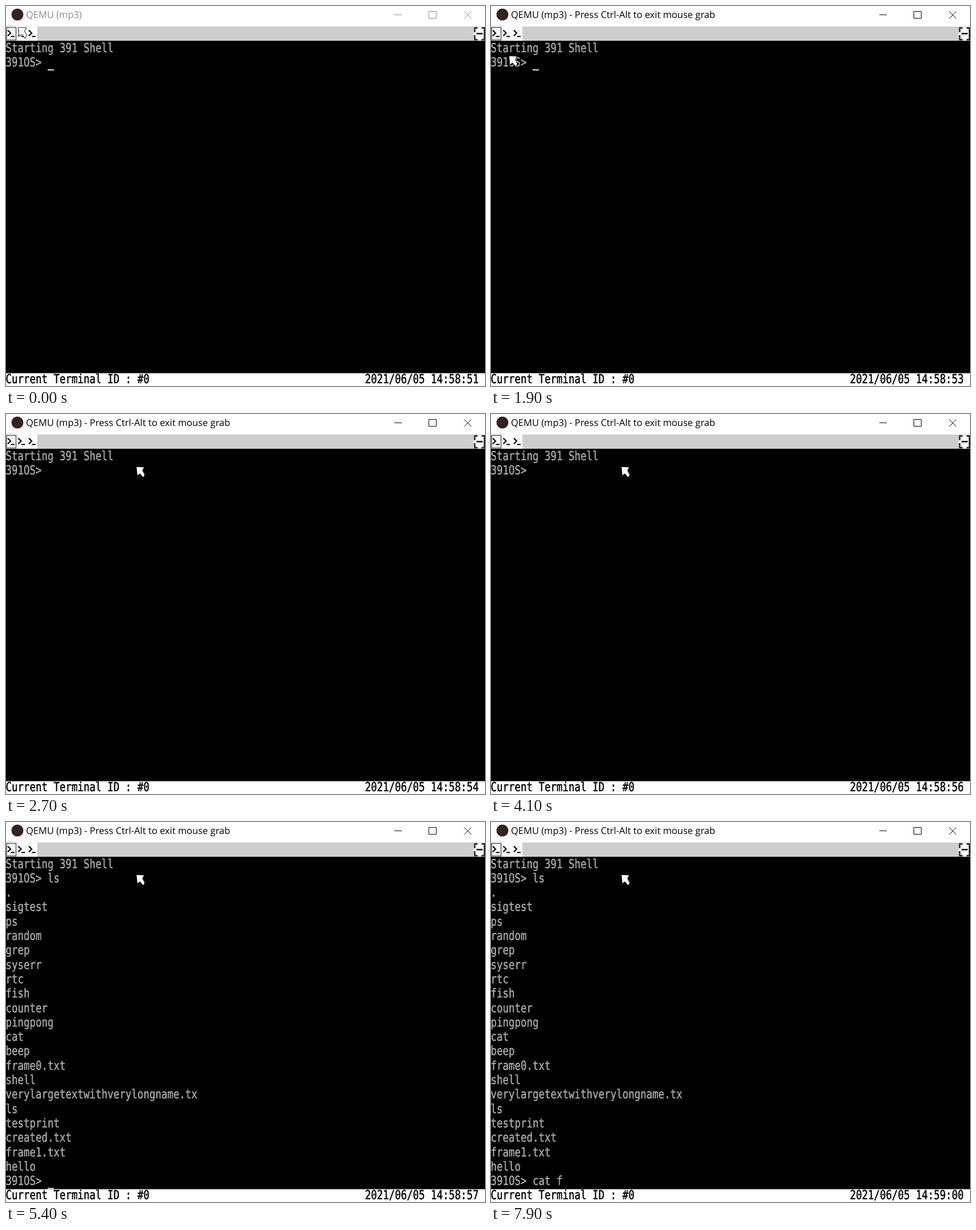
An HTML page for the animation above (8 s loop, 840 by 667 pixels).

```html
<!DOCTYPE html>
<html lang="en">
<head>
<meta charset="utf-8">
<title>Terminal session</title>
<style>
  html, body { margin: 0; width: 100%; height: 100%; overflow: hidden; background: #fff; }
  svg { display: block; }
  text { white-space: pre; text-rendering: geometricPrecision; }
  .title { font: 16.5px "Open Sans", sans-serif; }
  .cell { font: 17.44px "DejaVu Sans Mono", monospace; stroke-width: .4px; }
  .shell { fill: #aaa; stroke: #aaa; }
  .status { fill: #000; stroke: #000; }
</style>
</head>
<body>
<svg id="stage" width="840" height="667" viewBox="0 0 840 667">
  <defs>
    <g id="prompt" fill="none" stroke="#000" stroke-width="2.2">
      <path d="M3 42.500L8 47.500L3 52.500M8.500 53.500H15"/>
    </g>
  </defs>
  <rect width="840" height="667" fill="#fff"/>
  <circle cx="20" cy="15" r="10.5" fill="#33221e"/>
  <g id="chrome">
    <text id="title" class="title" x="35" y="21"></text>
    <path fill="none" stroke="currentColor"
      d="M681 15.500H694M741.500 9.500H754.500V21.500H741.500ZM803.500 9.500L816 22M816 9.500L803.500 22"/>
  </g>

  <rect y="36" width="840" height="25.500" fill="#cecece"/>
  <rect y="36" width="55" height="25.500" fill="#fff"/>
  <rect x="1" y="37.500" width="16.500" height="22" fill="#fff" stroke="#777" stroke-width="2"/>
  <use href="#prompt"/>
  <use href="#prompt" x="18.500"/>
  <use href="#prompt" x="37"/>
  <rect x="822" y="38.500" width="17" height="20.500" fill="#fff" stroke="#222" stroke-width="2.500"/>
  <path d="M827 37H834V61H827ZM820 46H824V51H820Z" fill="#fff"/>
  <path d="M825 48.500H836" stroke="#111" stroke-width="2.500"/>

  <rect y="61" width="840" height="583.500" fill="#000"/>
  <g id="screen"></g>
  <rect id="caret" width="11" height="2.600" fill="#c4c4c4"/>
  <path id="pointer" fill="#fff" stroke="#000" stroke-width="1.600" paint-order="stroke"
    d="M0 0L13 .500L10 6L14 13.500L11.500 18L6 11.500L1.500 14.500Z"/>
</svg>
<script>
const LOOP = 8000, COL = 10.5, ROW = 25.3, BASE = 80.5, LAST_ROW = 22;
const $ = id => document.getElementById(id);

const files = `. sigtest ps random grep syserr rtc fish counter pingpong cat beep frame0.txt shell
  verylargetextwithverylongname.tx ls testprint created.txt frame1.txt hello`.split(/\s+/);

// [time, typed text]
const firstCommand = [[0, ''], [5000, 'l'], [5100, 'ls']];
const secondCommand = [[0, ''], [6300, 'c'], [6500, 'ca'], [6700, 'cat'], [7000, 'cat '], [7900, 'cat f']];
const LISTED = 5400;

// [time, caret shown]
const blinks = [[0, true], [400, false], [1300, true], [2100, false], [3000, true], [3800, false],
  [4700, true], [5500, false], [6400, true], [7200, false]];

// [time, x, y] of the pointer tip
const path = [[1200, 22, 38], [1700, 3, 63], [1900, 32, 88], [2300, 130, 94], [2700, 229, 93]];

const latest = (steps, t) => steps.filter(s => s[0] <= t).pop()[1];

function addText(col, row, kind, content = '') {
  const node = document.createElementNS('http://www.w3.org/2000/svg', 'text');
  node.setAttribute('class', 'cell ' + kind);
  node.setAttribute('transform', `translate(${col * COL - .4} ${BASE + row * ROW}) scale(1 1.25)`);
  node.textContent = content;
  $('screen').append(node);
  return node;
}

function setText(node, content) {
  if (node.textContent !== content) node.textContent = content;
}

addText(0, 0, 'shell', 'Starting 391 Shell');
const firstLine = addText(0, 1, 'shell');
const listing = files.map((name, i) => addText(0, i + 2, 'shell', name));
const secondLine = addText(0, LAST_ROW, 'shell');
addText(0, LAST_ROW + 1, 'status', 'Current Terminal ID : #0');
const clock = addText(60, LAST_ROW + 1, 'status');

function clockText(t) {
  const seconds = 51 + (t < 500 ? 0 : 1 + Math.floor((t - 500) / 900));
  const pad = n => String(n).padStart(2, '0');
  return `2021/06/05 14:${pad(58 + Math.floor(seconds / 60))}:${pad(seconds % 60)}`;
}

function pointerAt(time) {
  const t = Math.floor(time / 100) * 100;
  if (t <= path[0][0]) return path[0].slice(1);
  const i = path.findIndex(p => p[0] > t);
  if (i < 0) return path[path.length - 1].slice(1);
  const [t0, x0, y0] = path[i - 1], [t1, x1, y1] = path[i];
  const k = (t - t0) / (t1 - t0);
  return [x0 + (x1 - x0) * k, y0 + (y1 - y0) * k];
}

function draw(t) {
  const active = t >= 1100, listed = t >= LISTED;
  const color = active ? '#000' : '#8c8c8c';
  $('chrome').style.color = $('chrome').style.fill = color;
  setText($('title'), 'QEMU (mp3)' + (active ? ' - Press Ctrl-Alt to exit mouse grab' : ''));

  const first = latest(firstCommand, t), second = latest(secondCommand, t);
  setText(firstLine, '391OS> ' + first);
  setText(secondLine, '391OS> ' + second);
  for (const line of [...listing, secondLine]) line.style.display = listed ? '' : 'none';
  setText(clock, clockText(t));

  const typed = listed ? second : first, row = listed ? LAST_ROW : 1;
  $('caret').setAttribute('x', (7 + typed.length) * COL - .5);
  $('caret').setAttribute('y', BASE + row * ROW + 5);
  $('caret').style.display = latest(blinks, t) ? '' : 'none';
  $('pointer').setAttribute('transform', `translate(${pointerAt(t)})`);
}

const start = performance.now();
function tick() {
  draw((performance.now() - start) % LOOP);
  requestAnimationFrame(tick);
}
tick();
</script>
</body>
</html>
```
